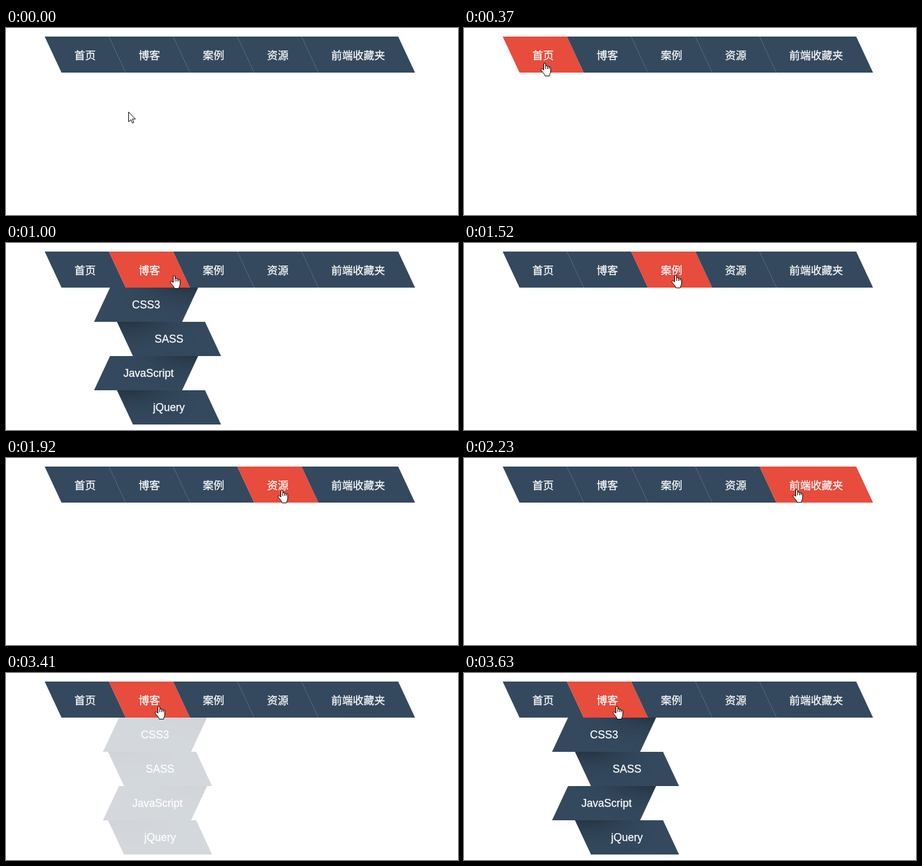
These frames come from a looping animation (739x306 px, 4100 ms). An HTML page:

```html
<!DOCTYPE html>
<html lang="zh-CN">
<head>
<meta charset="utf-8">
<title>Skewed menu</title>
<style>
  html, body { margin: 0; width: 100%; height: 100%; overflow: hidden; background: #fff; }
  body { position: relative; font-size: 17.6px; color: #fff; -webkit-text-stroke: .25px #fff; }
  ul { margin: 0; padding: 0; list-style: none; }
  .menu {
    position: absolute; left: 76.8px; top: 14px; display: flex;
    font-family: "Noto Sans CJK SC", "Noto Sans CJK", sans-serif;
  }
  .menu li {
    position: relative; z-index: 0; width: 105px; height: 59px;
    line-height: 59px; text-align: center; white-space: nowrap;
  }
  .menu li:last-child { width: 158px; }
  .menu li::before {
    content: ""; position: absolute; inset: 0; z-index: -1;
    background: #34495e; transform: skewX(25deg);
  }
  .menu li.on::before { background: #e74c3c; }
  .submenu {
    position: absolute; left: 157px; top: 73px;
    font-family: "Liberation Sans", Arial, sans-serif;
  }
  .submenu li {
    position: relative; width: 144px; height: 56px; line-height: 56px;
    text-align: center; overflow: hidden; background: #34495e;
  }
  .submenu li:nth-child(odd) { transform: translateX(var(--shift)) skewX(-25deg); }
  .submenu li:nth-child(even) { transform: translateX(calc(37.5px - var(--shift))) skewX(25deg); }
  .submenu span { position: relative; z-index: 1; display: block; }
  .submenu li:nth-child(odd) span { transform: skewX(25deg); }
  .submenu li:nth-child(even) span { transform: skewX(-25deg); }
  .submenu .wide { left: 4px; }
  .submenu li::after {
    content: ""; position: absolute; top: -125%; width: 100%; height: 100%;
    box-shadow: 0 0 50px rgba(0, 0, 0, .9);
  }
  .submenu li:nth-child(odd)::after { right: -50%; transform: skewX(-25deg) rotate(3deg); }
  .submenu li:nth-child(even)::after { left: -50%; transform: skewX(25deg) rotate(3deg); }
  svg { position: absolute; left: 0; top: 0; width: 20px; height: 25px; overflow: visible; }
  svg path { fill: #fff; stroke: #000; stroke-linejoin: round; }
</style>
</head>
<body>
<ul class="submenu">
  <li><span>CSS3</span></li>
  <li><span>SASS</span></li>
  <li><span class="wide">JavaScript</span></li>
  <li><span>jQuery</span></li>
</ul>
<ul class="menu">
  <li>首页</li><li>博客</li><li>案例</li><li>资源</li><li>前端收藏夹</li>
</ul>
<svg id="arrow"><path d="M.5 .5V16.5L4.2 13 6.7 18.5 9 17.5 6.6 12H11.5Z"/></svg>
<svg id="hand"><path d="M5.5 11.5V2a1.5 1.5 0 0 1 3 0V6a1.5 1.5 0 0 1 3 0V6.8a1.3 1.3 0 0 1 2.6 0V8a1.3 1.3 0 0 1 2.6 0V14c0 3-2 4-2 7.5H7.5C7 18 3 15 1 12c-1-2 1-3 2.5-1.6ZM8.5 6V10M11.5 6.5V10M14.1 7.5V10"/></svg>
<script>
const LOOP = 4100;
const STEP = 77;      // pause between two visible pointer steps
const FADE = 270;
const SLOPE = Math.tan(25 * Math.PI / 180);
const START = { x: 200, y: 137 };

// Pointer moves; each one starts where the last one ended
const MOVES = [
  { from: 70, to: 450, x: 129, y: 53 },
  { from: 690, to: 1000, x: 275, y: 53 },
  { from: 1230, to: 1520, x: 346, y: 52 },
  { from: 1770, to: 2000, x: 462, y: 52 },
  { from: 2150, to: 2390, x: 580, y: 51 },
  { from: 2620, to: 2780, x: 568, y: 91 },
  { from: 2860, to: 3090, x: 302, y: 138 },
  { from: 3170, to: 3410, x: 250, y: 54 },
  { from: 3490, to: 3630, x: 250, y: 54 }
];

const items = [...document.querySelectorAll('.menu li')];
const submenu = document.querySelector('.submenu');
const arrow = document.getElementById('arrow');
const hand = document.getElementById('hand');

const mix = (a, b, u) => a + (b - a) * u;
const easeOut = u => 1 - (1 - u) ** 1.7;
const bezier = (a, b, u) => 3 * a * u * (1 - u) ** 2 + 3 * b * u * u * (1 - u) + u ** 3;

// Same curve as the CSS "ease" keyword
function ease(x) {
  if (x <= 0) return 0;
  if (x >= 1) return 1;
  let lo = 0, hi = 1;
  for (let i = 0; i < 24; i++) {
    const mid = (lo + hi) / 2;
    if (bezier(.25, .25, mid) < x) lo = mid; else hi = mid;
  }
  return bezier(.1, 1, lo);
}

const fade = (clock, start) => ease((clock - start) / FADE);

// Pointer position and the stepped clock that the whole scene follows
function sample(time) {
  let state = { clock: 0, ...START };
  let origin = START;
  for (const move of MOVES) {
    if (time < move.from) break;
    const last = Math.round((move.to - move.from) / STEP);
    const progress = (time - move.from) / (move.to - move.from);
    const step = Math.min(last, Math.floor(progress * last + .3));
    const u = easeOut((step + 1) / (last + 1));
    state = {
      clock: mix(move.from, move.to, step / last),
      x: Math.round(mix(origin.x, move.x, u)),
      y: Math.round(mix(origin.y, move.y, u))
    };
    origin = move;
  }
  return state;
}

function hoveredItem(x, y) {
  if (y < 14 || y >= 73) return -1;
  const flat = x - (y - 14) * SLOPE - 63;
  return Math.min(Math.floor(flat / 105), items.length - 1);
}

function place(cursor, x, y, visible) {
  cursor.style.visibility = visible ? 'visible' : 'hidden';
  cursor.style.transform = `translate(${x}px, ${y}px)`;
}

function draw(now) {
  const { clock, x, y } = sample(now % LOOP);
  const hovered = hoveredItem(x, y);
  items.forEach((item, i) => item.classList.toggle('on', i === hovered));

  const open = fade(clock, 737) - fade(clock, 1225) + fade(clock, 3359);
  submenu.style.opacity = Math.max(0, open) ** 1.2;
  submenu.style.setProperty('--shift', 20 * (1 - open) + 'px');

  place(arrow, x, y, hovered < 0);
  place(hand, x - 7, y, hovered >= 0);
}

function tick() {
  draw(performance.now());
  requestAnimationFrame(tick);
}
tick();
</script>
</body>
</html>
```
